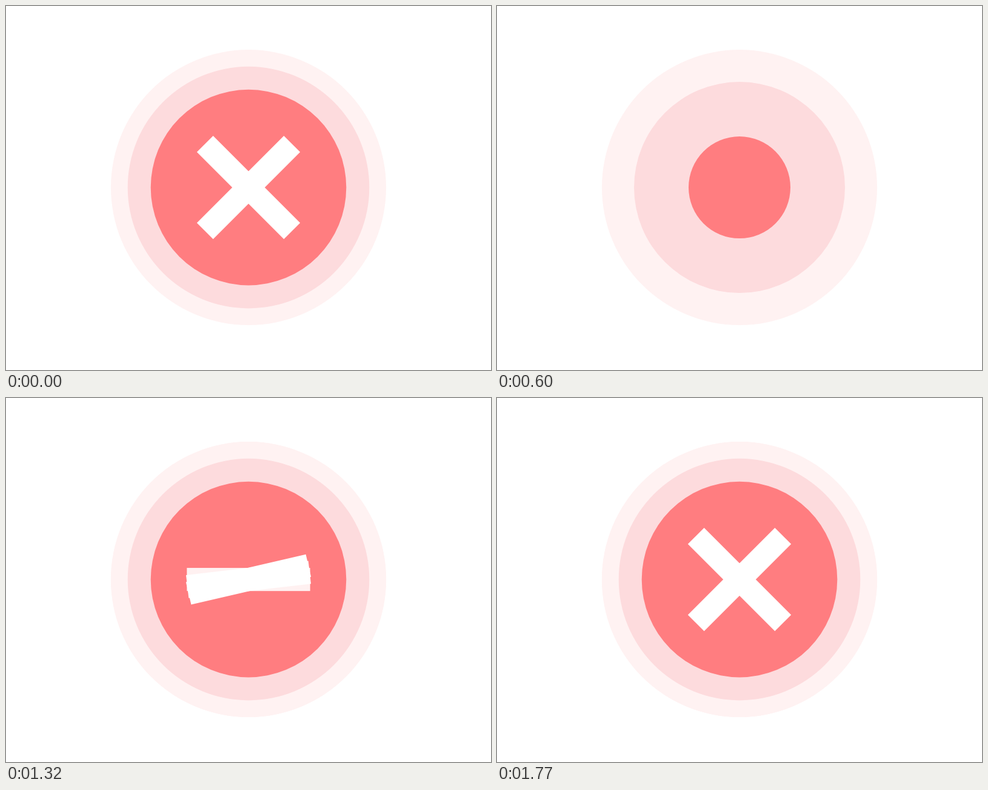
An HTML page with a canvas for the animation above (2.25 s loop, 800 px wide and 600 px high).

```html
<!DOCTYPE html>
<html>
<head>
<meta charset="utf-8">
<style>
html, body { margin: 0; overflow: hidden; background: #fff; }
canvas { display: block; }
</style>
</head>
<body>
<canvas id="stage" width="800" height="600"></canvas>
<script>
const ctx = document.getElementById('stage').getContext('2d');
const LOOP = 2250, STEP = 30;
const POP = 240, GROW = 930, SPIN = 1290, REST = 1770;

const discs = [
  { color: '#fff2f2', radius: 227, start: 132 },
  { color: '#fddbdd', radius: 199.3, start: 224 },
  { color: '#ff7d80', radius: 161.3, start: 344 },
];
const bars = [
  { end: -45, peak: -53, peakTime: 1530 },
  { end: -135, peak: -150, peakTime: 1590 },
];

const progress = (t, from, to) => Math.min(1, Math.max(0, (t - from) / (to - from)));
const smooth = x => x * x * (3 - 2 * x);

// cubic-bezier(.42, 0, .58, 1)
function easeInOut(x) {
  let low = 0, high = 1;
  for (let i = 0; i < 20; i++) {
    const u = (low + high) / 2, v = 1 - u;
    if (1.26 * u * v * v + 1.74 * u * u * v + u * u * u < x) low = u;
    else high = u;
  }
  return smooth((low + high) / 2);
}

function drawDisc({ color, radius }, scale) {
  ctx.fillStyle = color;
  ctx.beginPath();
  ctx.arc(0, 0, radius * scale, 0, 2 * Math.PI);
  ctx.fill();
}

function drawBar(angle, scale = 1, alpha = 1) {
  ctx.save();
  ctx.rotate(angle * Math.PI / 180);
  ctx.globalAlpha = alpha;
  ctx.fillStyle = '#fff';
  ctx.fillRect(-101.5 * scale, -19, 203 * scale, 38);
  ctx.restore();
}

function barAngle({ end, peak, peakTime }, t) {
  if (t <= SPIN) return 0;
  if (t < peakTime) return peak * smooth(progress(t, 1260, peakTime));
  return peak + (end - peak) * smooth(progress(t, peakTime, REST));
}

function drawBars(t, alpha) {
  for (const bar of bars) drawBar(barAngle(bar, t), 1, alpha);
}

function draw(t) {
  ctx.setTransform(1, 0, 0, 1, 0, 0);
  ctx.fillStyle = '#fff';
  ctx.fillRect(0, 0, 800, 600);
  ctx.translate(400, 299.1);

  for (const disc of discs) drawDisc(disc, 1);
  if (t < GROW) drawBars(REST, 1);
  if (t < POP) return;

  for (const disc of discs) drawDisc(disc, easeInOut(progress(t, disc.start, disc.start + 500)));
  // Cover the disc left from the previous loop until the new one is complete.
  if (t < GROW) return;

  if (t <= SPIN) {
    drawBar(0, easeInOut(progress(t, GROW, SPIN)));
    return;
  }
  if (t < REST) {
    drawBars(t - 2 * STEP, 0.18);
    drawBars(t - STEP, 0.6);
  }
  drawBars(t, 1);
}

const began = performance.now();
function tick() {
  const t = (performance.now() - began) % LOOP;
  draw(Math.floor(t / STEP) * STEP);
  requestAnimationFrame(tick);
}
tick();
</script>
</body>
</html>
```
